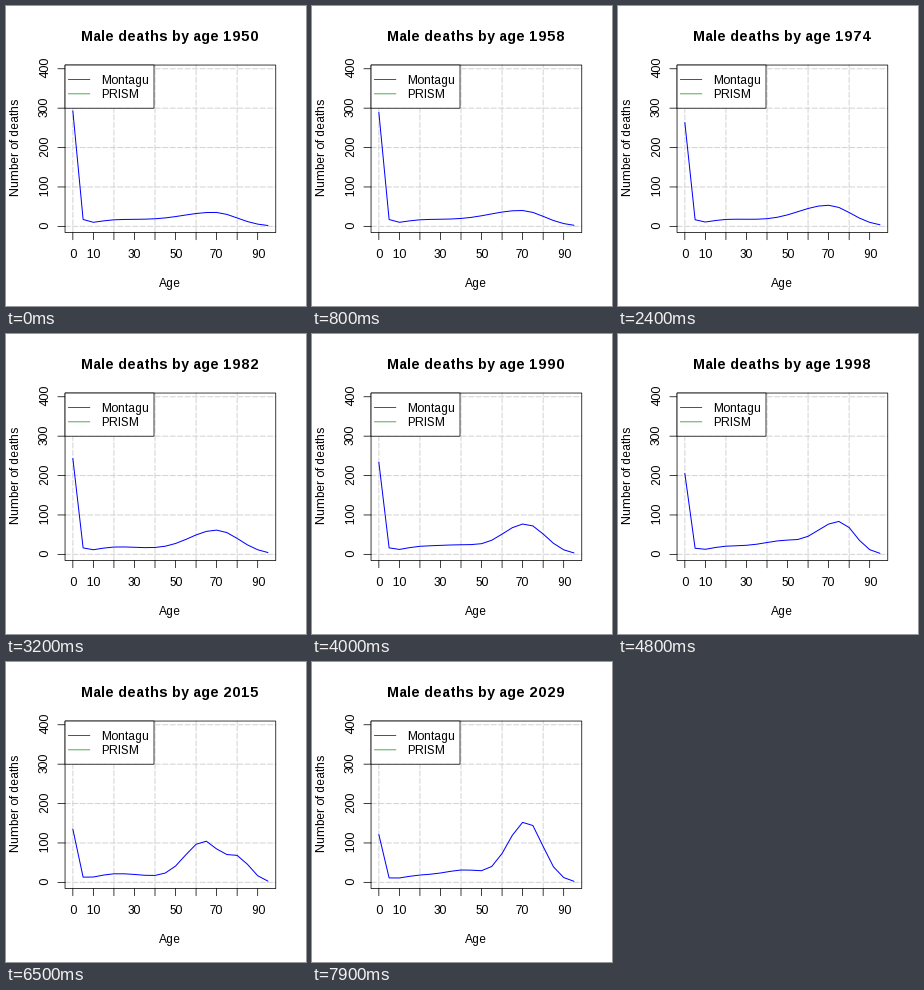
Write a matplotlib script that moves like this. It is 300x300 px and loops after 8000 ms.

```python
import numpy as np
import matplotlib.pyplot as plt
from matplotlib.animation import FuncAnimation
from matplotlib.patches import Rectangle

SIZE, DPI = 300, 72
FIRST, FRAMES, STEP = 1950, 80, 100
LEFT, RIGHT, TOP, BOTTOM = 59.04, 269.76, 59.04, 226.56
THIN = 0.75
BLUE, GREEN = "#0000ff", "#228b22"

plt.rcParams["font.family"] = "Liberation Sans"
plt.rcParams["text.hinting_factor"] = 1  # whole-pixel letter advances

AGES = np.arange(0, 100, 5)
SURVEY_AGES = np.array([0, 1, *range(5, 70, 5)])
SURVEY_YEARS = range(2000, 2012)


def px(age):
    return LEFT + (np.asarray(age) + 3.8) * (RIGHT - LEFT) / 102.6


def py(deaths):
    return 220.36 - 0.394 * np.asarray(deaths)


def trend(year, **points):
    """Straight-line interpolation through points such as y1950=290."""
    return np.interp(year, [int(k[1:]) for k in points], list(points.values()))


def wave(centre, height, rise, fall):
    """Bell over the ages with its own width on each side."""
    d = AGES - centre
    return height * np.exp(-0.5 * (d / np.where(d < 0, rise, fall)) ** 2)


def deaths_in(year):
    infant = trend(year, y1950=290, y1965=283, y1982=240, y1990=230,
                   y2004=180, y2015=131, y2029=118)
    youth = trend(year, y1965=16, y1990=20, y2015=22, y2029=18)
    # The older generation ages and fades while the boom cohort takes over.
    old_age = trend(year, y1950=69, y1965=70, y1982=70, y1990=71.5,
                    y2004=78, y2015=80.5, y2029=85)
    old = trend(year, y1950=35, y1965=44, y1982=61, y1990=77,
                y2004=88, y2015=58, y2029=5)
    rise = trend(year, y1965=18, y1982=14, y1990=12, y2004=12.5, y2015=5.5)
    fall = trend(year, y1982=11, y1990=9.5, y2004=6)
    boom_age = trend(year, y1990=42, y2004=51, y2015=64, y2029=72)
    boom = trend(year, y1982=0, y1990=10, y2004=30, y2015=103, y2029=155)
    echo = trend(year, y2015=0, y2029=21)
    return (infant * np.exp(-AGES / 1.55)
            + wave(22, youth, 12, 18)
            + wave(old_age, old, rise, fall)
            + wave(boom_age, boom, 9.5, 7.5)
            + wave(year - 1986, echo, 9, 7.5))


def survey_in(year):
    rng = np.random.default_rng(year)
    adult = np.minimum(0.33 * SURVEY_AGES, 14)
    noise = rng.uniform(0.65, 1.35, SURVEY_AGES.size)
    return 17 * np.exp(-SURVEY_AGES) + adult * noise + 27 * np.exp((SURVEY_AGES - 65) / 2)


fig = plt.figure(figsize=(SIZE / DPI, SIZE / DPI), dpi=DPI, facecolor="white")
ax = fig.add_axes([0, 0, 1, 1])
ax.set(xlim=(0, SIZE), ylim=(SIZE, 0))
ax.axis("off")


def line(xs, ys, color="black", width=THIN, z=4, **kw):
    return ax.plot(xs, ys, color=color, lw=width, zorder=z, snap=False,
                   solid_capstyle="round", solid_joinstyle="round", **kw)[0]


def label(x, y, text, size=12, ha="center", **kw):
    return ax.text(x, y, text, fontsize=size, ha=ha, va="baseline", zorder=7, **kw)


def side_label(x, y, text):
    label(x, y - 1, text, rotation=90, rotation_mode="anchor")


def box(x0, y0, x1, y1, fill, z):
    ax.add_patch(Rectangle((x0, y0), x1 - x0, y1 - y0, fc=fill, ec="black",
                           lw=THIN, zorder=z, snap=False))


# Grid
dash = dict(z=1, color="lightgray", width=1, dashes=(5.25, 2.25),
            dash_capstyle="round")
for age in range(0, 100, 20):
    line([px(age)] * 2, [BOTTOM, TOP], **dash)
for n in range(0, 500, 100):
    line([LEFT, RIGHT], [py(n)] * 2, **dash)

# Axes
box(LEFT, TOP, RIGHT, BOTTOM, "none", 4)
for age in range(0, 100, 10):
    line([px(age)] * 2, [BOTTOM, BOTTOM + 7.2])
for age in (0, *range(10, 100, 20)):
    label(px(age), 252, str(age))
for n in range(0, 500, 100):
    line([LEFT - 7.2, LEFT], [py(n)] * 2)
    side_label(42, py(n), str(n))
label((LEFT + RIGHT) / 2, 281, "Age")
side_label(13.5, (TOP + BOTTOM) / 2, "Number of deaths")
title = label((LEFT + RIGHT) / 2, 35, "", size=14.4, weight="bold")

# Legend
box(LEFT, TOP, 148, 102.2, "white", 5)
for y, name, color in ((73.44, "Montagu", BLUE), (87.84, "PRISM", GREEN)):
    line([62.3, 83.9], [y, y], color, z=6)
    label(94.7, y + 4.4, name, ha="left")

model = line([], [], BLUE, 1, z=2.5)
survey = line([], [], GREEN, THIN, z=2.6)


def draw(i):
    year = FIRST + i
    title.set_text(f"Male deaths by age {year}")
    model.set_data(px(AGES), py(deaths_in(year)))
    survey.set_data(px(SURVEY_AGES), py(survey_in(year)))
    survey.set_visible(year in SURVEY_YEARS)
    return title, model, survey


anim = FuncAnimation(fig, draw, frames=FRAMES, interval=STEP, repeat=True,
                     repeat_delay=0)
plt.show()
```
